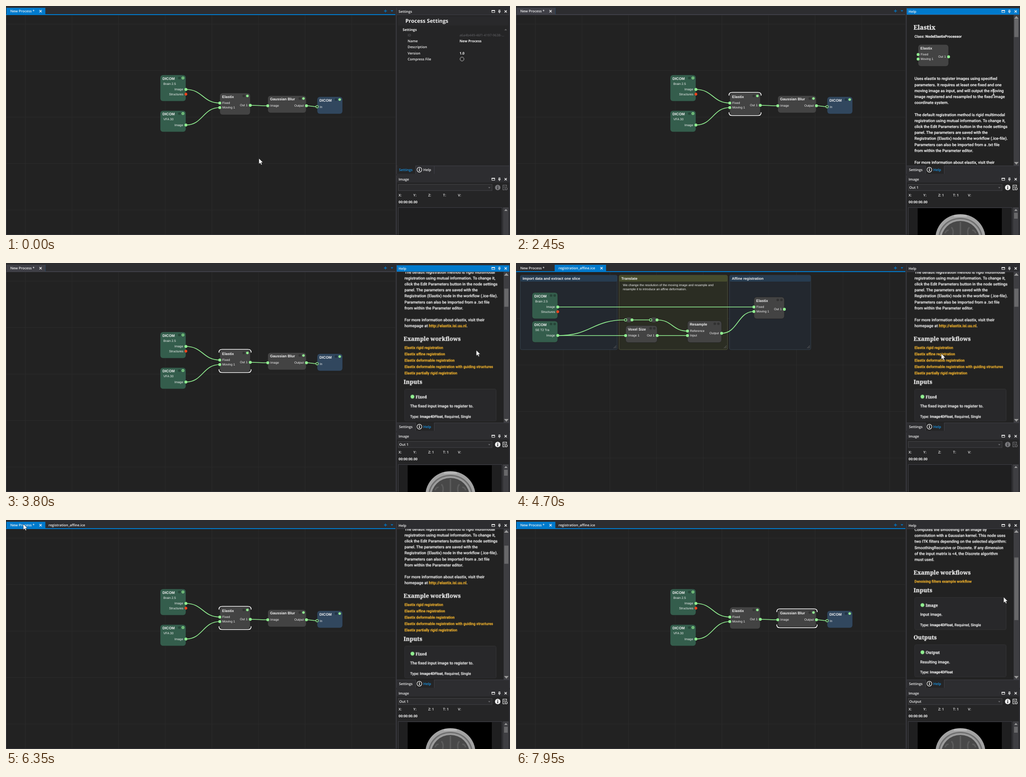
Write an HTML page that moves like this. It is 1108 by 505 pixels and loops after 8 s.

```html
<!DOCTYPE html>
<html lang="en">
<head>
<meta charset="utf-8">
<title>Node editor help</title>
<style>
html, body { margin: 0; width: 100%; height: 100%; overflow: hidden; background: #2d2d30; }
svg { display: block; width: 1108px; height: 505px; }
text { fill: #f4f4f4; white-space: pre; text-rendering: geometricPrecision; }
.ui { font: 600 7.7px "Open Sans", sans-serif; }
.uib { font: 700 7.7px "Open Sans", sans-serif; }
.uih { font: 700 11.7px "Open Sans", sans-serif; }
.id { font: 400 7.4px "Open Sans", sans-serif; fill: #66666a; }
.port { font: 6.9px "Liberation Sans", Arial, sans-serif; }
.name { font: bold 8.1px "Liberation Sans", Arial, sans-serif; }
.end { text-anchor: end; }
.body { font: 500 8.75px Roboto, sans-serif; stroke: #f4f4f4; stroke-width: .2; }
.small { font: 500 8.03px Roboto, sans-serif; stroke: #f4f4f4; stroke-width: .2; }
.bold { font-weight: 700; }
.link { fill: #fdbb2f; stroke: #fdbb2f; stroke-width: .25; }
.h1, .h2, .h3 { stroke: #f4f4f4; stroke-width: .25; }
.h1 { font: bold 13.8px "Noto Serif", serif; }
.h2 { font: bold 12.55px "Noto Serif", serif; }
.h3 { font: bold 8.7px "Noto Serif", serif; }
.accent { fill: #1794e6; }

/* switches */
.main, .ice, .tab2, .focus, .elSel, .gSel, .setA, .setB, .setTab, .help, .elDoc, .gDoc, .img, .noImg,
.late, .hover, .arrow, .beam { animation: 8s step-end infinite; }
.main { animation-name: main; }
.ice { animation-name: ice; }
.tab2 { animation-name: tab2; }
.focus { animation-name: focus; }
.elSel { animation-name: elSel; }
.gSel, .gDoc { animation-name: second; }
.elDoc { animation-name: first; }
.setA { animation-name: setA; }
.setB { animation-name: setB; }
.setTab { animation-name: setTab; }
.help { animation-name: help; }
.img { animation-name: img; }
.noImg { animation-name: noImg; }
.late { animation-name: late; }
.hover { animation-name: hover; }
.arrow { animation-name: arrow; }
.beam { animation-name: beam; }
@keyframes main { 0%, 78.125%, 100% { opacity: 1 } 57.5% { opacity: 0 } }
@keyframes ice { 0%, 78.125%, 100% { opacity: 0 } 57.5% { opacity: 1 } }
@keyframes tab2 { 0% { opacity: 0 } 57.5%, 100% { opacity: 1 } }
@keyframes focus { 0%, 57.5%, 100% { opacity: 0 } 14.375% { opacity: 1 } }
@keyframes elSel { 0%, 86.25%, 100% { opacity: 0 } 9.375% { opacity: 1 } }
@keyframes first { 0% { opacity: 1 } 86.25%, 100% { opacity: 0 } }
@keyframes second { 0% { opacity: 0 } 86.25%, 100% { opacity: 1 } }
@keyframes setA { 0% { opacity: 1 } 9.375%, 100% { opacity: 0 } }
@keyframes setB { 0% { opacity: 0 } 9.375%, 100% { opacity: 1 } }
@keyframes setTab { 0% { opacity: 1 } 14.375%, 100% { opacity: 0 } }
@keyframes help { 0% { opacity: 0 } 14.375%, 100% { opacity: 1 } }
@keyframes img { 0%, 57.5% { opacity: 0 } 10%, 78.125%, 100% { opacity: 1 } }
@keyframes noImg { 0%, 57.5% { opacity: 1 } 10%, 78.125%, 100% { opacity: 0 } }
@keyframes late { 0% { opacity: 0 } 88%, 100% { opacity: 1 } }
@keyframes hover { 0%, 57.5%, 100% { opacity: 0 } 52% { opacity: 1 } }
@keyframes arrow { 0%, 44%, 100% { opacity: 1 } 25% { opacity: 0 } }
@keyframes beam { 0%, 44%, 100% { opacity: 0 } 25% { opacity: 1 } }

/* motion */
.elScroll { animation: elScroll 8s linear infinite; }
.elThumb { animation: elThumb 8s linear infinite; }
.gScroll { animation: gScroll 8s linear infinite; }
.gThumb { animation: gThumb 8s linear infinite; }
.cursor { animation: cursor 8s ease-in-out infinite; }
@keyframes elScroll {
  0%, 32.5% { transform: translateY(0) }
  35.5%, 37.5% { transform: translateY(-72.4px) }
  41.2%, 100% { transform: translateY(-219.5px) }
}
@keyframes elThumb {
  0%, 32.5% { transform: translateY(0) }
  35.5%, 37.5% { transform: translateY(9.3px) }
  41.2%, 100% { transform: translateY(28px) }
}
@keyframes gScroll {
  0%, 97.5% { transform: translateY(0) }
  99.3%, 100% { transform: translateY(-128.8px) }
}
@keyframes gThumb {
  0%, 97.5% { transform: translateY(0) }
  99.3%, 100% { transform: translateY(54.5px) }
}
@keyframes cursor {
  0% { transform: translate(556px, 336px) }
  8.75%, 11% { transform: translate(503px, 222px) }
  14%, 21.25% { transform: translate(925px, 352px) }
  28.75%, 43.125% { transform: translate(1050px, 190px); animation-timing-function: ease-in }
  47.5% { transform: translate(1034px, 192px); animation-timing-function: linear }
  50% { transform: translate(985px, 230px); animation-timing-function: ease-out }
  52.5%, 60.5% { transform: translate(935px, 200px); animation-timing-function: ease-in }
  65% { transform: translate(878px, 215px); animation-timing-function: ease-out }
  70%, 73.125% { transform: translate(130px, 215px); animation-timing-function: linear }
  75.625% { transform: translate(66px, 98px); animation-timing-function: ease-out }
  78%, 82.8% { transform: translate(38px, 9px) }
  85.8%, 91.9% { transform: translate(622px, 215px) }
  96.25%, 100% { transform: translate(1072px, 170px) }
}
</style>
</head>
<body>
<svg id="stage" viewBox="0 0 1108 505"></svg>
<script>
const GREEN = '#90ee90', GRAY = '#434343', LEAF = '#345d4c', NAVY = '#31475e', BLUE = '#007acc';

const g = (cls, ...parts) => `<g class="${cls}">${parts.join('')}</g>`;
const text = (x, y, cls, s) => `<text x="${x}" y="${y}" class="${cls}">${s}</text>`;
const rect = (x, y, w, h, fill, more = '') =>
  `<rect x="${x}" y="${y}" width="${w}" height="${h}" fill="${fill}" ${more}/>`;
const dot = (x, y, r, fill, more = '') => `<circle cx="${x}" cy="${y}" r="${r}" fill="${fill}" ${more}/>`;
const oval = (x, y, rx, ry, fill) => `<ellipse cx="${x}" cy="${y}" rx="${rx}" ry="${ry}" fill="${fill}"/>`;
const path = (d, more) => `<path d="${d}" fill="none" ${more}/>`;
const shape = (d, fill) => `<path d="${d}" fill="${fill}"/>`;
const lines = (x, y, step, cls, list) => list.map((s, i) => text(x, y + i * step, cls, s)).join('');

// ---- node graph ----
const grid = (x0, y0) => {
  let d = '';
  for (let x = x0; x < 856; x += 102.5) d += `M${x} 20V505`;
  for (let y = y0; y < 505; y += 102.5) d += `M0 ${y}H856`;
  return rect(0, 20, 856, 485, '#222') + path(d, 'stroke="#2b2b2b"');
};
const wire = (x1, y1, x2, y2) => {
  const m = (x1 + x2) / 2;
  return path(`M${x1} ${y1}C${m} ${y1} ${m} ${y2} ${x2} ${y2}`, `stroke="${GREEN}" stroke-width="1.7"`);
};
const plug = (x, y) => dot(x, y, 3.2, GREEN);
const ring = (x, y) => dot(x, y, 2.7, '#222', `stroke="${GREEN}" stroke-width="1.3"`);
const input = (x, y, s) => plug(x, y) + text(x + 5.5, y + 2.4, 'port', s);
const output = (x, y, s) => plug(x, y) + text(x - 6, y + 2.4, 'port end', s);
const star = (x, y) => rect(x - 2.5, y - 2.5, 5, 5, '#f2441c') +
  rect(x - 2.5, y - 2.5, 5, 5, '#f2441c', `transform="rotate(45 ${x} ${y})"`);
const box = (x, y, w, h, fill, title, sub = '') =>
  rect(x, y, w, h, fill, 'rx="6" stroke="#1c1c1c" stroke-width=".6"') +
  text(x + 5, y + 10.5, 'name', title) + text(x + 7, y + 21.6, 'port', sub);
// status lamps: "on" filled, "ring" hollow, otherwise unlit
const lamps = (x, y, mode) => dot(x - 8, y, 2.8, '#0004') + (
  mode === 'on' ? dot(x, y, 2.8, GREEN) :
  mode === 'ring' ? dot(x, y, 2.3, LEAF, `stroke="${GREEN}" stroke-width="1.3"`) + dot(x, y, .8, GREEN) :
  dot(x, y, 2.8, '#0004'));
const selection = (x, y, w, h) => path(
  `M${x} ${y + 7}V${y + 6}Q${x} ${y} ${x + 7} ${y}H${x + w - 7}Q${x + w} ${y} ${x + w} ${y + 6}v1` +
  `M${x} ${y + h - 7}v1Q${x} ${y + h} ${x + 7} ${y + h}H${x + w - 7}Q${x + w} ${y + h} ${x + w} ${y + h - 6}v-1`,
  'stroke="#fff" stroke-width="1.7"');
const elastix = (x, y) => box(x, y, 67, 48, GRAY, 'Elastix') +
  input(x, y + 22, 'Fixed') + input(x, y + 32, 'Moving 1') + output(x + 67, y + 27, 'Out 1');
const brain = (x, y) => box(x, y, 56.5, 58, LEAF, 'DICOM', 'Brain 2.5') +
  output(x + 56.5, y + 32, 'Image') + text(x + 51, y + 44.8, 'port end', 'Structures') + star(x + 56.5, y + 42.4);
const scan = (x, y, sub) => box(x, y, 56.5, 47, LEAF, 'DICOM', sub) + output(x + 56.5, y + 31.8, 'Image');

const mainView = g('main', grid(42.5, 40),
  wire(395.5, 184, 470, 214), wire(395.5, 262.5, 470, 224), wire(537, 219, 575, 220), wire(660, 220, 684, 222),
  brain(339, 152), lamps(389, 158.7, 'ring'),
  scan(339, 230.7, 'VFA 30'), lamps(389, 237.3, 'ring'),
  elastix(470, 192), lamps(530.7, 198.2, 'on'),
  box(575.5, 197.7, 84.5, 38, GRAY, 'Gaussian Blur'), lamps(654, 204, 'on'),
  input(575.5, 220, 'Image'), output(660.5, 220, 'Output'),
  box(684, 200, 56, 38, NAVY, 'DICOM'), lamps(733.6, 206.2, 'on'),
  ring(684, 222), text(689.5, 224.6, 'port', 'In'),
  g('elSel', selection(468.3, 190.5, 70.5, 51)),
  g('gSel', selection(573.3, 196, 88.8, 41.5)));

const group = (x, w, head, body, edge, title) =>
  rect(x, 27, w, 164, body, `rx="3" stroke="${edge}"`) + rect(x, 27, w, 14, head, 'rx="3"') +
  text(x + 5, 37, 'name', title) +
  path(`M${x + w - 8} 188l6-6m-3 6l3-3`, 'stroke="#777" stroke-width=".8"');
const reroute = x => rect(x, 120, 14, 11, GRAY, 'rx="5"') + ring(x, 125.5) + plug(x + 14, 125.5);
const iceView = g('ice', grid(1.5, 122.5),
  group(9.5, 213, '#273c50', '#23282f', '#34404c', 'Import data and extract one slice'),
  group(226.5, 238.5, '#464c2d', '#2b2d23', '#50543c', 'Translate'),
  group(469.5, 178.5, '#273c50', '#23282f', '#34404c', 'Affine registration'),
  lines(235, 50.5, 9, 'port', ['We change the resolution of the moving image and resample and',
    'resample it to introduce an affine deformation.']),
  wire(92, 97, 523, 97), wire(92, 160, 241, 160), wire(92, 160, 241, 125.5), wire(255, 125.5, 296, 125.5),
  wire(310, 125.5, 377, 150), wire(310, 160, 377, 160), wire(452, 155, 523, 107),
  brain(35.3, 65), lamps(85, 71.7), scan(35.3, 128, 'SE T2 Tra'), lamps(85, 134.5),
  reroute(241), reroute(296),
  box(241, 138, 69.5, 37.5, GRAY, 'Voxel Size'), lamps(304, 144), input(241, 160, 'Image 1'), output(310.5, 160, 'Out 1'),
  box(377, 127.5, 75, 48, GRAY, 'Resample'), lamps(445, 134),
  input(377, 150, 'Reference'), input(377, 160, 'Input'), output(452, 155, 'Output'),
  elastix(523, 75), lamps(583.5, 81.5));

// ---- document tabs ----
const close = (x, y) => path(`M${x - 2.5} ${y - 2.5}l5 5m0-5l-5 5`, 'stroke="#f1f1f1" stroke-width="1.3"');
const tabs = rect(0, 0, 1108, 20, '#2d2d30') + rect(0, 18, 856, 2, BLUE) +
  g('focus', rect(0, 18, 856, 2, '#3f3f46')) +
  g('main', rect(1, 4, 85.5, 15, BLUE), g('focus', rect(1, 4, 85.5, 16, '#3f3f46')), close(76, 11.5)) +
  g('ice', rect(85, 4, 113, 15, BLUE), close(188, 11.5)) +
  text(9.5, 14, 'ui', 'New Process *') + g('tab2', text(93.5, 14, 'ui', 'registration_affine.ice')) +
  path('M831 11h6.5M834.2 7.8v6.4', `stroke="${BLUE}" stroke-width="1.3"`) + shape('M845.5 9.5h6l-3 3z', BLUE);

// ---- right side ----
const header = (y, title) => text(863, y + 3, 'ui', title) +
  path(`M1068 ${y - 2.2}h6.5v4.5h-6.5z`, 'stroke="#f1f1f1"') + rect(1067.5, y - 3, 7.5, 2, '#f1f1f1') +
  path(`M1083.5 ${y + .5}v-3.5h2.5v3.5m-4 .4h5.4M1084.7 ${y + 1}v3`, 'stroke="#f1f1f1" stroke-width="1.2"') +
  close(1098.5, y);
const info = (x, y, fill) => dot(x, y, 6, fill) + dot(x, y - 2.8, 1, '#2d2d30') + rect(x - .9, y - 1, 1.8, 4.8, '#2d2d30');
const labels = (y, list) => lines(883, y, 13.3, 'ui', list);

const settings = g('setTab', rect(859, 20, 248, 332, '#252526'), rect(862, 23, 242, 20, '#29292b'), header(12, 'Settings'),
  text(872, 55, 'uib', 'Settings'), shape('M1095.5 53.5l3-3 3 3z', '#666'),
  text(883, 67.3, 'id', 'ID'), text(997, 67.3, 'id', 'a6a4b449-46f1-4197-9638-...'),
  labels(80, ['Name', 'Description']),
  g('setA', text(878, 36.5, 'uih', 'Process Settings'), text(997, 80, 'uib', 'New Process'),
    labels(106.5, ['Version', 'Compress File']), text(997, 106.5, 'uib', '1.0'),
    dot(1002.5, 117, 4.3, 'none', 'stroke="#ccc"')),
  g('setB', text(878, 36.5, 'uih', 'Elastix Settings'), text(997, 80, 'uib', 'Elastix')));

const card = (y, name, about, type, late = '') =>
  rect(876.5, y, 201, 71, '#28282a', 'rx="3" stroke="#343436"') + dot(893.5, y + 16.7, 4.2, GREEN) +
  text(900.5, y + 20, 'h3', name) +
  g(late, text(888.5, y + 40.7, 'body', about),
    text(888.5, y + 63, 'small', `Type: <tspan class="bold">Image4DFloat</tspan>${type}`));
const scrollbar = (cls, h) => g(cls, rect(1095.5, 28.5, 9, h, '#68686a'));

const elDoc = g('elDoc', `<g clip-path="url(#view)">` + g('elScroll',
  text(874, 52, 'h1', 'Elastix'),
  text(876, 70.3, 'small', 'Class: <tspan class="bold">NodeElastixProcessor</tspan>'),
  elastix(884, 85),
  lines(876, 163.3, 13.2, 'body', [
    'Uses elastix to register images using specified',
    'parameters. It requires at least one fixed and one',
    'moving image as input, and will output the moving',
    'image registered and resampled to the fixed image',
    'coordinate system.', '',
    'The default registration method is rigid multimodal',
    'registration using mutual information. To change it,',
    'click the Edit Parameters button in the node settings',
    'panel. The parameters are saved with the',
    'Registration (Elastix) node in the workflow (.ice-file).',
    'Parameters can also be imported from a .txt file',
    'from within the Parameter editor.', '',
    'For more information about elastix, visit their',
    'homepage at <tspan class="link">http://elastix.isi.uu.nl</tspan>.']),
  text(874, 390.7, 'h2', 'Example workflows'),
  lines(876, 409.4, 13.85, 'small link', ['rigid', 'affine', 'deformable', 'deformable', 'partially rigid']
    .map((kind, i) => `Elastix ${kind} registration${i === 3 ? ' with guiding structures' : ''}`)),
  g('hover', rect(876, 424.5, 90, .8, '#fdbb2f')),
  text(874, 486, 'h2', 'Inputs'),
  card(497.5, 'Fixed', 'The fixed input image to register to.', ', Required, Single')) + '</g>',
  scrollbar('elThumb', 40));

const gDoc = g('gDoc', `<g clip-path="url(#view)">` + g('gScroll',
  text(874, 52, 'h1', 'Gaussian Blur'),
  box(884, 85, 66, 38, GRAY, 'Gaussian'), input(884, 107.3, 'Image'), output(950, 107.3, 'Output'),
  g('late', lines(876, 153, 13.2, 'body', [
    'Computes the smoothing of an image by',
    'convolution with a Gaussian kernel. This node uses',
    'two ITK filters depending on the selected algorithm:',
    'SmoothingRecursive or Discrete. If any dimension',
    'of the input matrix is &lt;4, the Discrete algorithm',
    'must used.']),
    text(876, 267, 'small link', 'Denoising filters example workflow')),
  text(874, 248.5, 'h2', 'Example workflows'),
  text(874, 288.3, 'h2', 'Inputs'),
  card(299.7, 'Image', 'Input image.', ', Required, Single', 'late'),
  text(874, 392.3, 'h2', 'Outputs'),
  card(403.8, 'Output', 'Resulting image.', '', 'late')) + '</g>',
  scrollbar('gThumb', 138));

const help = g('help', rect(859, 20, 248, 332, '#222'), g('focus', rect(859, 5, 248, 14.5, BLUE)), header(12, 'Help'),
  rect(1094, 20, 12, 332, '#3e3e42'), shape('M1095 28l5-6 5 6z', '#999'), shape('M1095 344l5 6 5-6z', '#999'),
  elDoc, gDoc);

const panelTabs = rect(859, 352, 248, 18, '#2d2d30') + path('M859 352.5H1107M900.5 353V370M941.5 353V370', 'stroke="#3f3f46"') +
  g('setTab', rect(860, 352, 40, 18, '#252526'), text(864, 364, 'ui accent', 'Settings'), text(917.5, 364, 'ui', 'Help')) +
  g('help', rect(901, 352, 40, 18, '#252526'), text(864, 364, 'ui', 'Settings'), text(917.5, 364, 'ui accent', 'Help')) +
  dot(908.8, 361, 5.3, 'none', 'stroke="#f1f1f1" stroke-width="1.2"') +
  rect(907.9, 360, 1.8, 4, '#f1f1f1') + dot(908.8, 358.2, 1, '#f1f1f1');

const tools = color => info(1081, 400.3, color) +
  path('M1100.5 399v-4h-8v10.5h4M1094.5 398h4M1094.5 400.5h2', `stroke="${color}" stroke-width="1.2"`) +
  dot(1099.5, 403, 2.5, 'none', `stroke="${color}" stroke-width="1.2"`);
const photo = '<g clip-path="url(#frame)">' + rect(883, 446, 185, 59, '#000') +
  oval(977, 513, 55, 54, '#a2a2a2') + oval(977, 514, 49, 47, '#6f6f6f') +
  oval(977, 514, 46, 44, '#9c9c9c') + oval(977, 515, 42, 41, '#484848') +
  path('M977 476V505M957 488q6 5 3 18M997 488q-6 5-3 18M943 501q4-8 8-6M1011 501q-4-8-8-6', 'stroke="#5c5c5c" stroke-width="3"') +
  rect(962, 461, 30, 4, '#b8b8b8', 'rx="2"') + '</g>';
const imagePanel = rect(859, 370, 249, 135, '#2d2d30') + header(382, 'Image') +
  rect(859, 389, 248, 116, '#252526') + rect(862.5, 393.5, 206, 13.5, '#2b2b2d', 'stroke="#434346"') +
  shape('M1060 399.5h5l-2.5 2.5z', '#77777a') +
  ['X:', 'Y:', 'Z:', 'T:', 'V:'].map((s, i) => text(863 + i * 32.6, 420, 'ui', s)).join('') +
  text(863, 434.5, 'uib', '00:00:00.00') +
  rect(862.5, 444.5, 228, 70, '#1f1f20', 'stroke="#3f3f46"') + rect(1092.5, 444, 12.5, 61, '#3e3e42') +
  shape('M1095.5 452l3.5-4.5 3.5 4.5z', '#999') +
  g('noImg', tools('#77777a')) +
  g('img', tools('#f1f1f1'), photo, rect(1095, 456, 8, 13, '#68686a'),
    text(936.5, 420, 'ui', '1'), text(969, 420, 'ui', '1'),
    g('elDoc', text(864.5, 403.3, 'ui', 'Out 1')), g('gDoc', text(864.5, 403.3, 'ui', 'Output')));

const cursor = g('cursor',
  g('arrow', '<path d="M0 0V12.5L2.9 9.9 4.9 14.3 7 13.4 5 9.1H9Z" fill="#fff" stroke="#111" stroke-width=".6"/>'),
  g('beam', path('M-2.5-6.5q2.5 0 2.5 1.5q0-1.5 2.5-1.5M0-5V5M-2.5 6.5q2.5 0 2.5-1.5q0 1.5 2.5 1.5',
    'stroke="#fff" stroke-width="1.2"')));

document.getElementById('stage').innerHTML =
  `<defs><clipPath id="view">${rect(859, 20, 235, 332, '#000')}</clipPath>
   <clipPath id="frame">${rect(883, 446, 185, 59, '#000')}</clipPath></defs>` +
  rect(0, 0, 1108, 505, '#2d2d30') + mainView + iceView + path('M.5 20V505', 'stroke="#3f3f46"') + tabs +
  settings + help + panelTabs + imagePanel +
  path('M859 19.5H1107M858.5 4V370M1107 4V370M858.5 374V505M1107 374V505', 'stroke="#3f3f46"') +
  path('M0 504.5H856', 'stroke="#3f3f46"') + cursor;
</script>
</body>
</html>
```
